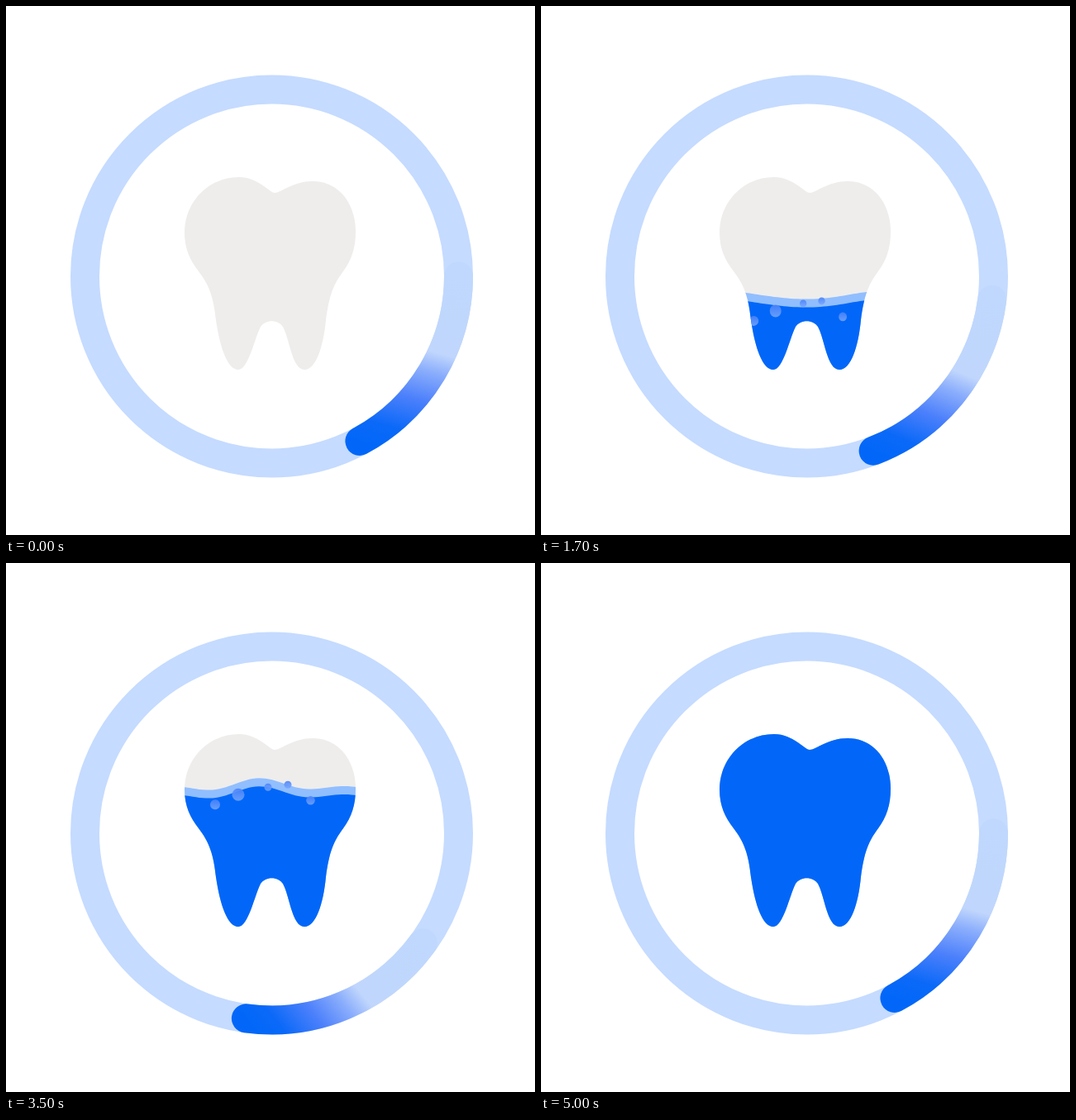
These frames come from a looping animation (640x640 px, 5100 ms). An HTML page:

```html
<!DOCTYPE html>
<html lang="en">
<head>
<meta charset="utf-8">
<title>Tooth loader</title>
<style>
  html, body { margin: 0; width: 100%; height: 100%; overflow: hidden; background: #fff; }
  svg { display: block; width: 100vw; height: 100vh; }
</style>
</head>
<body>
<svg viewBox="0 0 640 640">
  <defs>
    <linearGradient id="trail" gradientUnits="userSpaceOnUse" x1="226" y1="0" x2="168" y2="216">
      <stop offset="0" stop-color="#c0d8fd"/>
      <stop offset=".43" stop-color="#c0d6fc"/>
      <stop offset=".54" stop-color="#8aadfc"/>
      <stop offset=".7" stop-color="#4c80fb"/>
      <stop offset=".88" stop-color="#0b69f8"/>
      <stop offset="1" stop-color="#0267f8"/>
    </linearGradient>
    <linearGradient id="drop" x1="0" y1="0" x2="0" y2="1">
      <stop offset="0" stop-color="#4781fa" stop-opacity=".9"/>
      <stop offset="1" stop-color="#78a6fd" stop-opacity=".85"/>
    </linearGradient>
    <path id="tooth" d="M325 226C319 226 305 207 282 207C244 207 216 238 216 274C216 294 223 308 233 321C246 338 251 352 254 380C259 414 268 440 281 440C293 440 300.5 403 308 388C314 379 329 379 335 388C343 402 346 440 361 440C375 440 384 412 387 380C391 350 396 337 408 321C418 307 423 293 423 273C423 238 402 212 371 212C347 212 333 226 325 226Z"/>
    <clipPath id="inside"><use href="#tooth"/></clipPath>
  </defs>
  <g transform="translate(321.5 327)" fill="none" stroke-width="35">
    <circle r="226" stroke="#c5dbff"/>
    <path id="arc" d="M226 0A226 226 0 0 1 106.4 199.4" stroke="url(#trail)" stroke-linecap="round"/>
  </g>
  <use href="#tooth" fill="#eeedec"/>
  <g clip-path="url(#inside)">
    <path id="foam" fill="#91beff"/>
    <path id="water" fill="#0267f8"/>
    <g id="bubbles" fill="url(#drop)">
      <circle cx="-67" cy="12" r="6"/>
      <circle cx="-39" r="7.5"/>
      <circle cx="-3" cy="-9" r="4.5"/>
      <circle cx="21" cy="-12" r="4.5"/>
      <circle cx="48.5" cy="7" r="5.3"/>
    </g>
  </g>
</svg>
<script>
const LOOP = 5100, STEP = 100, FILL = 5000, TURNS = 3;
const LEFT = 214, RIGHT = 426, WIDTH = 208, FOAM = 10;
const { PI, sin, cos } = Math;
const $ = id => document.getElementById(id);

// [time, height] of the rising liquid
const LEVEL = [[0, 442], [800, 398], [1700, 349.5], [2500, 315], [2900, 293.5], [4000, 249], [FILL, 195]];

const ramp = (t, from, to) => Math.max(0, Math.min(1, (t - from) / (to - from)));

function levelAt(t) {
  const i = Math.max(1, LEVEL.findIndex(([time]) => t <= time));
  const [[t0, y0], [t1, y1]] = LEVEL.slice(i - 1, i + 1);
  return y0 + (y1 - y0) * ramp(t, t0, t1);
}

// A slowing swell runs to the left; shorter chop builds up near the top.
function heightAt(x, t) {
  const angle = (x - 216) / WIDTH * 2 * PI;
  const u = (t - 2400) / 1000, k = t / FILL;
  const phase = (33 * u * u - 321 * u - 64) * PI / 180;
  const swell = 6 * sin(PI * k) * cos(angle - phase);
  const chop = 6 * sin(PI * k ** 4) * cos(2 * angle - 2.3);
  return levelAt(t) + swell + chop;
}

function wave(t, shift) {
  let d = `M${LEFT} 460`;
  for (let x = LEFT; x <= RIGHT; x += 4) d += `L${x} ${(heightAt(x, t) + shift).toFixed(2)}`;
  return d + `V460Z`;
}

function draw(t) {
  $('arc').setAttribute('transform', `rotate(${t / FILL * TURNS * 360})`);
  $('foam').setAttribute('d', wave(t, 0));
  $('water').setAttribute('d', wave(t, FOAM));

  const bob = 12.5 + 7.5 * cos(2 * PI * (t - 1850) / 2300);
  const spread = 0.93 + 0.07 * ramp(t, 1700, 2500);
  $('bubbles').setAttribute('transform', `translate(320 ${levelAt(t) + bob}) scale(${spread} 1)`);
  $('bubbles').setAttribute('opacity', ramp(t, 1000, 1500) * (1 - ramp(t, 4500, 4900)));
}

const start = performance.now();
function tick() {
  // a small lead keeps each step on its beat
  const t = (performance.now() - start + 10) % LOOP;
  draw(Math.floor(t / STEP) * STEP);
  requestAnimationFrame(tick);
}
tick();
</script>
</body>
</html>
```
